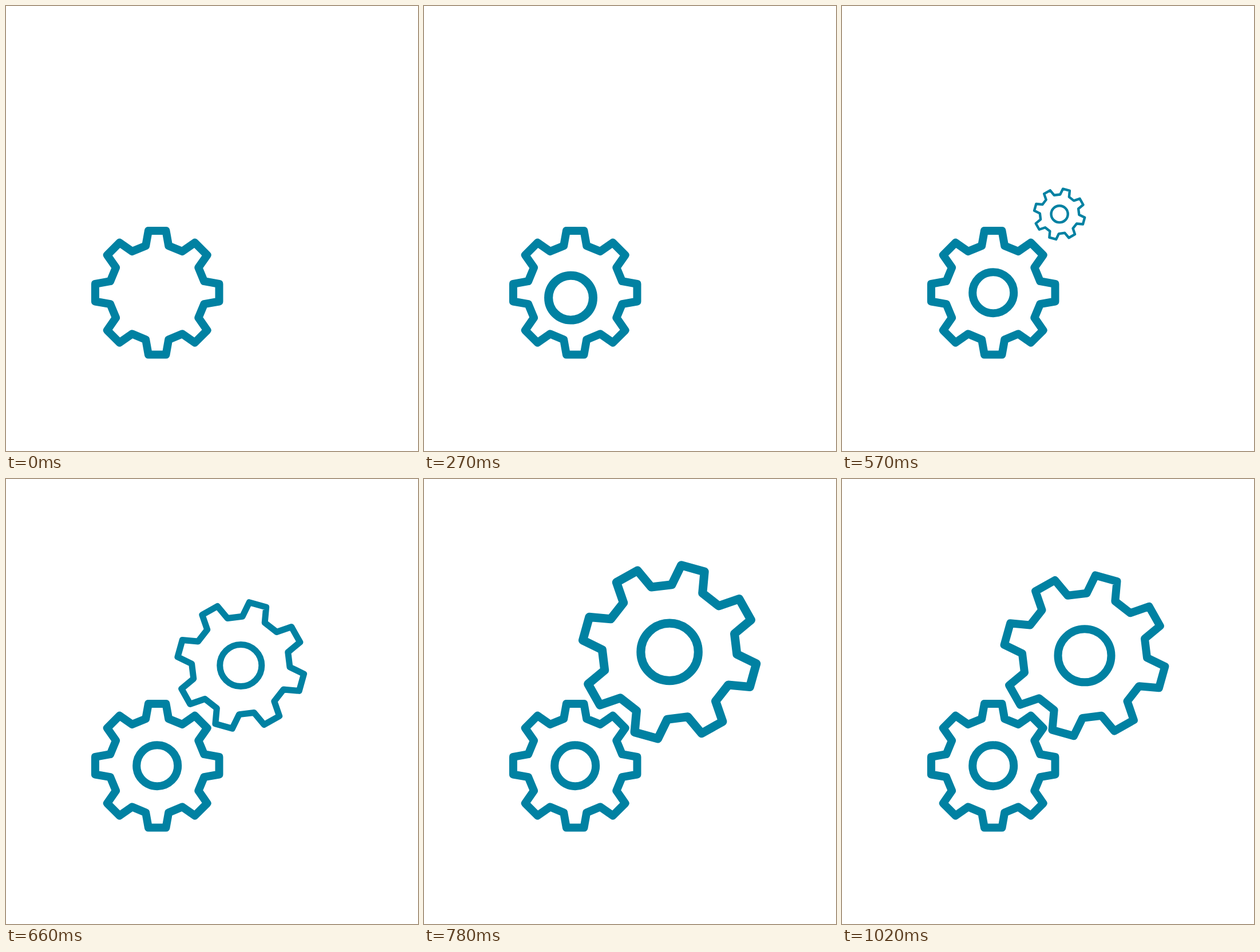
Animation, 720 px wide and 778 px high, one loop 8000 ms. Source, as an HTML page:

```html
<!DOCTYPE html>
<html lang="en">
<head>
<meta charset="utf-8">
<title>Gears</title>
<style>
  html, body { margin: 0; width: 100%; height: 100%; overflow: hidden; background: #fff; }
  svg { display: block; width: 100%; height: 100%; }
</style>
</head>
<body>
<svg viewBox="0 0 720 778" fill="none" stroke="#0081a2" stroke-width="14" stroke-linejoin="round">
  <path id="small"/>
  <g id="hub"><circle cx="264.2" cy="501.2" r="36"/></g>
  <g id="large">
    <path id="rim"/>
    <circle cx="424" cy="308.8" r="46.5"/>
  </g>
</svg>
<script>
const LOOP = 8000, STEP = 30;
const GROW = 7, SETTLE = 10, PEAK = 1.1;
const CX = 360, CY = 389;
const el = id => document.getElementById(id);

// Eight teeth; each is a trapezoid given by its tip and root half-widths.
function gear(cx, cy, tipR, tipHalf, rootR, rootHalf, turn) {
  const tooth = [[-rootHalf, -rootR], [-tipHalf, -tipR], [tipHalf, -tipR], [rootHalf, -rootR]];
  const points = [];
  for (let i = 0; i < 8; i++) {
    const a = (turn + i * 45) * Math.PI / 180, c = Math.cos(a), s = Math.sin(a);
    for (const [x, y] of tooth) {
      points.push((cx + x * c - y * s).toFixed(2) + ' ' + (cy + x * s + y * c).toFixed(2));
    }
  }
  return 'M' + points.join('L') + 'Z';
}

// Grow past full size, then settle back, both at constant speed.
function pop(step) {
  if (step <= 0) return 0;
  if (step < GROW) return PEAK * step / GROW;
  return Math.max(1, PEAK - (PEAK - 1) * (step - GROW) / SETTLE);
}

function zoom(node, scale) {
  node.setAttribute('visibility', scale ? 'visible' : 'hidden');
  node.setAttribute('transform', `translate(${CX} ${CY}) scale(${scale}) translate(${-CX} ${-CY})`);
}

el('small').setAttribute('d', gear(264.2, 501.2, 108.3, 15.3, 82, 20, 0));
el('rim').setAttribute('d', gear(424, 308.8, 140.3, 19.5, 106, 25.8, 15.6));
const hub = el('hub'), large = el('large');

function draw(ms) {
  const step = Math.floor(ms / STEP);
  zoom(hub, pop(step));
  zoom(large, pop(step - GROW - SETTLE));
}

const start = performance.now();
function tick() {
  draw((performance.now() - start) % LOOP);
  requestAnimationFrame(tick);
}
tick();
</script>
</body>
</html>
```
